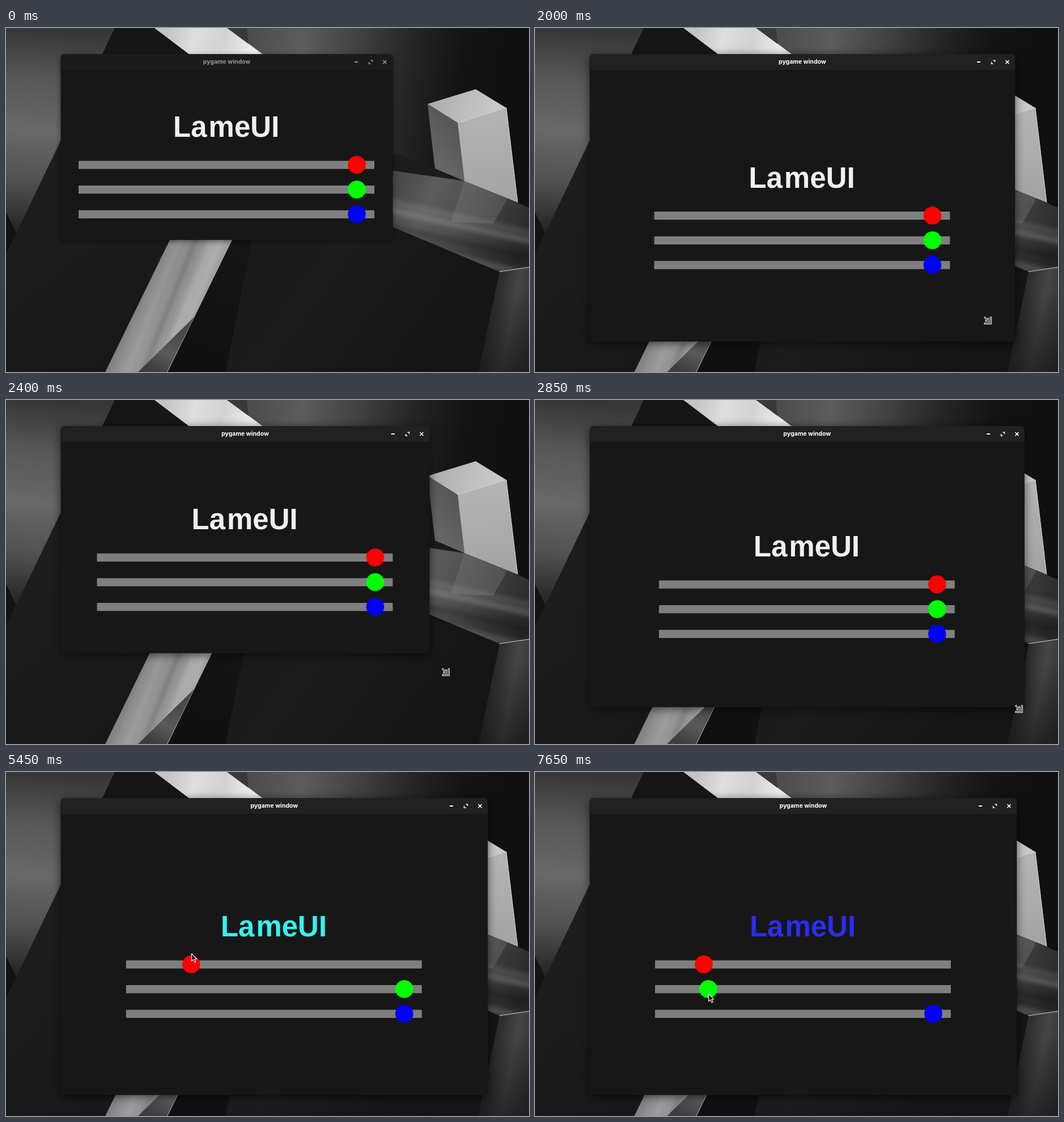
Write an HTML page with a canvas that moves like this. It is 923 by 607 pixels and loops after 8 s.

```html
<!DOCTYPE html>
<html lang="en">
<head>
<meta charset="utf-8">
<title>Sliders</title>
<style>
html, body { margin: 0; width: 100%; height: 100%; overflow: hidden; background: #17181a; }
canvas { display: block; }
</style>
</head>
<body>
<canvas id="stage" width="923" height="607"></canvas>
<script>
const W = 923, H = 607, LOOP = 8000, STEP = 50;
const LEFT = 96.5, TOP = 46, HEADER = 28;
const TRACK = 522, REST = 491, GAP = 43.6;
const GRIP_LAG = 100;
const ctx = document.getElementById('stage').getContext('2d');

const point = (x, y) => ({ x, y });
const leg = (start, end, to) => ({ start, end, to });
const shifted = (p, dx, dy) => point(p.x + dx, p.y + dy);

// Eased travel through consecutive legs, resting in between
function travel(from, legs, t) {
  return legs.reduce((p, { start, end, to }) => {
    const u = Math.min(1, Math.max(0, (t - start) / (end - start)));
    const s = u * u * (3 - 2 * u);
    return point(p.x + (to.x - p.x) * s, p.y + (to.y - p.y) * s);
  }, from);
}

function layout(corner) {
  return {
    corner,
    x: (LEFT + corner.x) / 2 - 0.5 - TRACK / 2,
    y: (TOP + HEADER + corner.y) / 2 + 10.4
  };
}

const knob = (box, i, value) => point(box.x + value, box.y + i * GAP + 7);

const small = point(682.7, 374), large = point(850.3, 570);
const finalBox = layout(large);

const grip = t => travel(point(850, 556), [
  leg(1870, 2200, point(730.7, 433)),
  leg(2200, 2650, point(864, 542)),
  leg(2800, 3300, large)
], t);

const pointerLegs = [
  leg(100, 400, point(719, 361)),
  leg(950, 1150, shifted(small, -4, -4)),
  leg(3700, 3750, shifted(large, -13, -5)),
  leg(3750, 3800, shifted(large, -21, -14)),
  leg(3800, 4050, point(783, 487)),
  leg(4350, 4650, knob(finalBox, 0, REST)),
  leg(4950, 5450, shifted(knob(finalBox, 0, 115), 0, -19)),
  leg(5650, 5900, shifted(knob(finalBox, 0, 86), 0, -17)),
  leg(6350, 6900, shifted(knob(finalBox, 1, REST), -5, 7)),
  leg(7000, 7650, shifted(knob(finalBox, 1, 94), 0, 8))
];
const pointer = t => travel(point(122, 16), pointerLegs, t);

function shape(c, points) {
  c.beginPath();
  points.forEach(([x, y]) => c.lineTo(x, y));
  c.closePath();
}

function poly(c, points, fill) {
  shape(c, points);
  c.fillStyle = fill;
  c.fill();
}

function line(c, points, color, width) {
  c.beginPath();
  points.forEach(([x, y]) => c.lineTo(x, y));
  c.strokeStyle = color;
  c.lineWidth = width;
  c.stroke();
}

const gray = level => `rgb(${level},${level},${level})`;

// Linear ramp of evenly spaced gray levels
function ramp(c, [x0, y0], [x1, y1], ...levels) {
  const g = c.createLinearGradient(x0, y0, x1, y1);
  levels.forEach((level, i) => g.addColorStop(i / (levels.length - 1), gray(level)));
  return g;
}

// Soft cloth-like folds: parallel blurred lines whose tone follows a wave
function folds(c, area, [x, y], [dx, dy], [stepX, stepY], count, strength) {
  c.save();
  shape(c, area);
  c.clip();
  c.filter = 'blur(4px)';
  for (let i = 0; i < count; i++) {
    const wave = Math.sin(i * 1.3 + 0.6);
    const tone = wave > 0 ? 205 : 10;
    const x0 = x + i * stepX, y0 = y + i * stepY;
    line(c, [[x0, y0], [x0 + dx, y0 + dy]], `rgba(${tone},${tone},${tone},${Math.abs(wave) * strength})`, 10);
  }
  c.restore();
}

function paintWallpaper() {
  const canvas = document.createElement('canvas');
  canvas.width = W;
  canvas.height = H;
  const c = canvas.getContext('2d');
  c.fillStyle = ramp(c, [0, 350], [200, H], 29, 27, 23);
  c.fillRect(0, 0, W, H);

  // Walls behind everything
  const wallEdge = [18, 362], wallTop = [192, 0];
  poly(c, [[400, 0], [W, 0], [W, 330], [650, 330]],
    ramp(c, [430, 0], [900, 70], 76, 92, 66, 38, 19, 16));
  poly(c, [[0, 0], wallTop, wallEdge, [0, 325]],
    ramp(c, [40, 0], [10, 362], 54, 88, 104, 80, 34));
  poly(c, [[0, 325], wallEdge, [0, 398]], gray(19));

  // Bright beam along the top
  poly(c, [wallTop, [262, 0], [324, 47], [170, 47]], gray(22));
  poly(c, [[262, 0], [391, 0], [454, 47], [324, 47]],
    ramp(c, [285, 0], [430, 40], 196, 222, 210, 236));
  poly(c, [[390, 0], [425, 0], [428, 28]], gray(57));

  // Floor blocks and the beam standing between them
  const ridge = [871, 430];
  const beamX = y => 472 - 0.489 * y, floorX = y => 509 - 0.2 * y;
  poly(c, [[beamX(360), 360], [floorX(360), 360], [floorX(H), H], [beamX(H), H]],
    ramp(c, [400, 374], [330, H], 21, 16));
  poly(c, [[floorX(350), 350], [683, 351], ridge, [834, H], [floorX(H), H]],
    ramp(c, [450, 380], [760, H], 26, 28, 23, 21));
  const beam = [[beamX(364), 364], [beamX(364) + 110, 364], [beamX(H) + 110, H], [beamX(H), H]];
  poly(c, beam, ramp(c, [255, 440], [365, 495], 128, 150, 168, 166));
  folds(c, beam, [beamX(360), 360], [-100, 250], [14, 2], 8, 0.22);
  poly(c, [[332, 510], [284, H], [233, H]], ramp(c, [300, 540], [265, H], 74, 90, 62));

  // Beam crossing to the right
  const foot = [809, 270], far = [W, 317];
  const crossing = [[670, 250], foot, far, [W, 422], ridge, [670, 346]];
  poly(c, [[670, 223], [694, 223], foot, [670, 255]], gray(28));
  poly(c, crossing, ramp(c, [690, 270], [920, 380], 72, 92, 80, 58, 40));
  poly(c, [foot, [885, 301], [860, 345], [785, 342]], 'rgba(125,125,125,.35)');
  folds(c, crossing, [670, 305], [270, 60], [2, 15], 7, 0.3);

  // Lower right block
  const side = [[...ridge], [W, 422], [W, H], [834, H]];
  poly(c, side, ramp(c, [852, 510], [930, 525], 40, 70, 48));
  const fade = c.createLinearGradient(0, 460, 0, H);
  fade.addColorStop(0, 'rgba(20,20,20,0)');
  fade.addColorStop(1, 'rgba(20,20,20,.6)');
  poly(c, side, fade);
  line(c, [ridge, [W, 422]], gray(208), 1.2);

  // Upright box
  const near = [797, 167], left = [744, 134], right = [883, 141], base = [903, 308];
  poly(c, [left, near, foot, [757, 248]], ramp(c, [750, 220], [800, 180], 102, 86));
  poly(c, [near, right, base, foot], ramp(c, [840, 150], [850, 300], 180, 172, 164));
  poly(c, [left, [829, 108], right, near], ramp(c, [760, 120], [870, 155], 174, 190, 202));
  line(c, [near, right, base], gray(215), 1);
  return canvas;
}

function drawWindow({ x: right, y: bottom }, active) {
  const width = right - LEFT, radii = [7, 7, 0, 0];
  ctx.save();
  ctx.shadowColor = `rgba(0,0,0,${active ? 0.6 : 0.45})`;
  ctx.shadowBlur = active ? 16 : 10;
  ctx.shadowOffsetY = 3;
  ctx.fillStyle = gray(23);
  ctx.beginPath();
  ctx.roundRect(LEFT, TOP, width, bottom - TOP, radii);
  ctx.fill();
  ctx.restore();

  ctx.fillStyle = gray(active ? 33 : 27);
  ctx.beginPath();
  ctx.roundRect(LEFT, TOP, width, HEADER, radii);
  ctx.fill();

  const ink = gray(active ? 255 : 150);
  ctx.fillStyle = ink;
  ctx.font = 'bold 10.5px Inter, sans-serif';
  ctx.textAlign = 'center';
  ctx.fillText('pygame window', (LEFT + right) / 2, 63.3);

  ctx.save();
  ctx.translate(Math.floor(right), 60);
  ctx.fillRect(-67, -1, 6, 2);
  for (const s of [-1, 1]) {
    line(ctx, [[-38.5, s * 3], [-38.5 + s * 3, s * 3], [-38.5 + s * 3, 0]].map(([x, y]) => [x, -y]), ink, 1.5);
    line(ctx, [[-16.5, -3 * s], [-10.5, 3 * s]], ink, 1.7);
  }
  ctx.restore();
}

function drawContent(box, values) {
  const middle = box.x + TRACK / 2, baseline = box.y - 42.4;
  ctx.fillStyle = `rgb(${values.map(v => Math.round(v / TRACK * 255))})`;
  ctx.font = 'bold 51px "Liberation Sans", Arial, sans-serif';
  ctx.textAlign = 'left';
  ctx.fillText('La', middle - 94, baseline);
  ctx.fillText('meUI', middle - 31.5, baseline);

  ['#f00', '#0f0', '#00f'].forEach((color, i) => {
    const { x, y } = knob(box, i, values[i]);
    ctx.fillStyle = gray(127);
    ctx.fillRect(box.x, y - 7, TRACK, 14.3);
    ctx.fillStyle = color;
    ctx.beginPath();
    ctx.arc(x, y, 15.8, 0, 2 * Math.PI);
    ctx.fill();
  });
}

function drawArrow({ x, y }) {
  ctx.save();
  ctx.translate(Math.round(x) + 0.5, Math.round(y) + 0.5);
  ctx.lineJoin = 'round';
  poly(ctx, [[0, 0], [0, 13], [3, 10.4], [5.2, 15.4], [7.4, 14.4], [5.2, 9.6], [9, 9.4]], gray(12));
  ctx.strokeStyle = '#fff';
  ctx.lineWidth = 1.1;
  ctx.stroke();
  ctx.restore();
}

function drawResize({ x, y }) {
  const elbow = (near, far) => [[far, near], [far, far], [near, far]];
  ctx.save();
  ctx.translate(Math.round(x) - 17, Math.round(y) - 5);
  ctx.lineCap = 'square';
  for (const [color, width] of [['#fff', 3], [gray(16), 1.1]]) {
    line(ctx, elbow(2, 12.5), color, width);
    line(ctx, [[2, 2], [7, 7]], color, width);
    line(ctx, elbow(4, 8), color, width);
  }
  ctx.restore();
}

const wallpaper = paintWallpaper();

function render(time) {
  const t = Math.floor(time % LOOP / STEP) * STEP;
  const active = t >= 2000;
  const box = layout(active ? grip(t - GRIP_LAG) : small);
  const cursor = pointer(t);
  const red = t < 5000 ? REST : pointer(Math.min(t, 5900)).x - box.x;
  const green = t < 7050 ? REST : cursor.x - box.x;

  ctx.drawImage(wallpaper, 0, 0);
  drawWindow(box.corner, active);
  drawContent(box, [red, green, REST]);

  if (t >= 1150 && t < 3800) drawResize(active ? grip(t) : small);
  else if (t >= 150) drawArrow(cursor);
}

let start;
function tick(now) {
  start ??= now;
  render(now - start);
  requestAnimationFrame(tick);
}
render(0);
requestAnimationFrame(tick);
</script>
</body>
</html>
```
